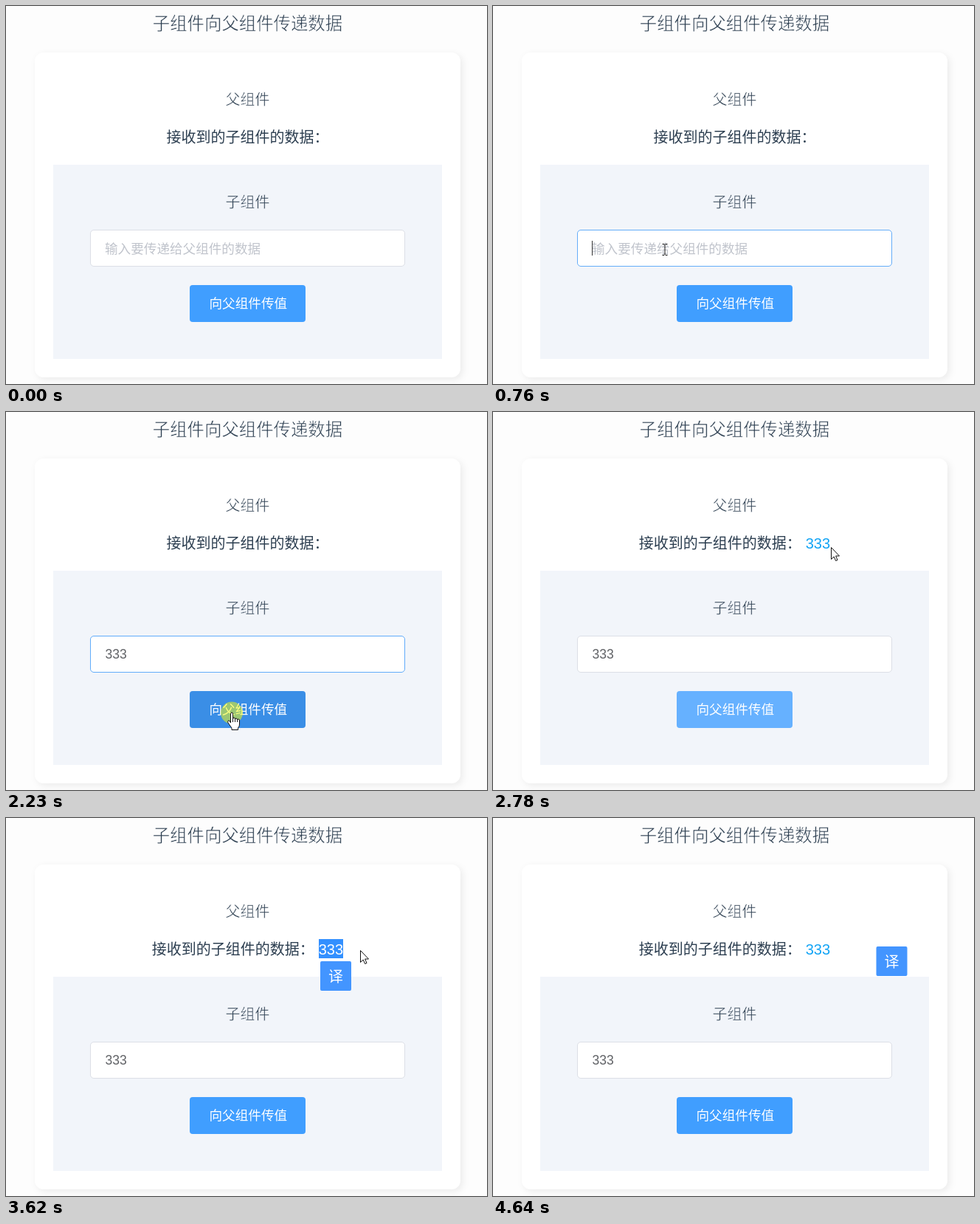
An HTML page that plays this animation: 652 px wide and 512 px high, repeating every 5440 ms.

```html
<!DOCTYPE html>
<html lang="zh-CN">
<head>
<meta charset="utf-8">
<title>组件传值</title>
<style>
  html, body { margin: 0; width: 100%; height: 100%; overflow: hidden; background: #fdfdfd; }
  svg { display: block; width: 652px; height: 512px; }
  text { font: 20px "Noto Sans CJK SC", "Noto Sans CJK", sans-serif; fill: #2c3e50; }
  .middle { text-anchor: middle; }
  /* A rim in the background colour thins the heading strokes */
  .light { text-anchor: middle; stroke: #fff; stroke-width: .55px; }
  .title { font-size: 23.4px; }
  .control { font-size: 17.6px; }
  .latin { font-family: "Liberation Sans", Arial, sans-serif; }
  .digits { font-size: 17.5px; fill: #606266; }
  .hint { fill: #c0c4cc; }
  .white { fill: #fff; }
  .card { fill: #fff; filter: drop-shadow(3px 3px 5px rgba(0, 0, 0, .07)); }
  .cursor { fill: #fff; stroke: #111; stroke-linejoin: round; }
</style>
</head>
<body>
<svg viewBox="0 0 652 512">
  <rect width="652" height="512" fill="#fdfdfd"/>
  <text class="light title" x="327.5" y="32">子组件向父组件传递数据</text>
  <rect class="card" x="39" y="63" width="577" height="440" rx="12"/>
  <text class="light" x="327.5" y="133.5">父组件</text>
  <rect id="selection" y="164" height="26" fill="#3390ff"/>
  <text id="label" y="185">接收到的子组件的数据：</text>
  <text id="result" class="latin" x="423.7" y="185">333</text>

  <rect x="64" y="215" width="527" height="263" fill="#f2f5fa"/>
  <text class="light" x="327.5" y="272.5" style="stroke:#f2f5fa">子组件</text>
  <rect id="field" x="114.5" y="303.5" width="426" height="49" rx="4.5" fill="#fff"/>
  <text id="hint" class="control hint" x="134" y="334.5">输入要传递给父组件的数据</text>
  <text id="typed" class="latin digits" x="134.5" y="334"></text>
  <rect id="caret" y="318" width="1" height="20" fill="#333"/>
  <rect id="button" x="249" y="378" width="157" height="50" rx="4"/>
  <text class="control white middle" x="328.3" y="408.5">向父组件传值</text>

  <g id="popup">
    <rect width="42" height="40" rx="2" fill="#4395ff"/>
    <text class="white middle" x="21" y="28">译</text>
  </g>
  <circle id="press" r="15" fill="#ff0" fill-opacity=".5"/>
  <g id="pointer" class="cursor">
    <path id="arrow" d="M.5 .5V16.5L4.2 13L6.6 18.5L9 17.5L6.6 12H11.5Z"/>
    <path id="beam" fill="none" d="M-3.5 -7.5H-1L0 -6.5L1 -7.5H3.5M0 -6.5V6.5M-3.5 7.5H-1L0 6.5L1 7.5H3.5"/>
    <path id="hand" d="M-1.5 13V1Q-1.5 -1 0 -1T1.5 1V8Q1.5 6 3 6T4.5 8Q4.5 7 6 7T7.5 9Q7.5 8 9 8T10.5 10V15Q10.5 18 8.5 20V22.5H0V20L-5 13Q-6 11 -4.5 10T-1.5 13ZM1.5 8V12M4.5 8V12M7.5 9V12"/>
  </g>
</svg>
<script>
const LOOP = 5440;
const TICK = 77.3;   // screen refresh interval in ms
const DIGIT = 11;    // width of one digit in the received value

const $ = id => document.getElementById(id);
const set = (id, attrs) => { for (const k in attrs) $(id).setAttribute(k, attrs[k]); };
const show = (id, on) => { $(id).style.display = on ? '' : 'none'; };
const clamp = (v, max = 1) => Math.max(0, Math.min(max, v));
const within = (t, from, to) => t >= from && t < to;
const progress = (t, from, to) => clamp((t - from) / (to - from));
const mix = (a, b, k) => a + (b - a) * k;
const inBox = (p, x, y, w, h) => within(p.x, x, x + w) && within(p.y, y, y + h);

const entry = { x: 338, y: 465 };
const moves = [
  { from: 70, to: 610, x: 233, y: 330 },     // to the field
  { from: 1860, to: 2000, x: 306, y: 408 },  // to the button
  { from: 2380, to: 2780, x: 458, y: 183 },  // to the end of the value
  { from: 2850, to: 3170, x: 427, y: 181 },  // drag across the value
  { from: 3480, to: 3630, x: 480, y: 179 },
  { from: 3630, to: 4030, x: 521, y: 161 },  // to an empty spot
  { from: 4100, to: 4550, x: 586, y: 420 }   // away
];

const pointerAt = t => moves.reduce((p, m) => {
  const k = progress(t, m.from, m.to);
  return { x: mix(p.x, m.x, k), y: mix(p.y, m.y, k) };
}, entry);

function draw(t) {
  const held = Math.floor(t / TICK + .2) * TICK;
  const p = pointerAt(held);
  const visible = within(t, 70, 1400) || within(t, 1760, 4640);
  const pressing = within(t, 2230, 2380);
  const dragging = within(t, 2850, 3480);
  const received = t >= 2380;
  const popupOpen = t >= 3480;
  const popup = t < 4100 ? { x: 426, y: 194 } : { x: 519.5, y: 174 };

  // Input field
  const count = clamp(Math.floor((t - 1400) / 140) + 1, 3);
  const focus = progress(held, 620, 820) - progress(held, 2200, 2400);
  set('field', { stroke: `rgb(${mix(220, 64, focus)}, ${mix(223, 158, focus)}, ${mix(230, 255, focus)})` });
  show('hint', count === 0);
  $('typed').textContent = '3'.repeat(count);
  set('caret', { x: Math.floor(134 + 9.73 * count) });
  show('caret', within(t, 610, 1140) || within(t, 1400, 2230));

  // Send button
  const overButton = inBox(p, 249, 378, 157, 50);
  const lit = visible && overButton || within(t, 2380, 2850);
  set('button', { fill: pressing ? '#3a8ee6' : lit ? '#66b1ff' : '#409eff' });

  // Received value and its selection
  set('label', { x: received ? 197.7 : 217.5 });
  show('result', received);
  const selected = within(t, 2850, 4030) ? dragging ? clamp(Math.round((457 - p.x) / DIGIT), 3) : 3 : 0;
  set('selection', { x: 457 - DIGIT * selected, width: DIGIT * selected });
  $('result').style.fill = selected === 3 ? '#fff' : '#12a4f5';

  // Translate popup
  show('popup', popupOpen);
  set('popup', { transform: `translate(${popup.x} ${popup.y})` });

  // Pointer
  const overPopup = popupOpen && inBox(p, popup.x, popup.y, 42, 40);
  const overText = inBox(p, 114, 303, 427, 50) || received && inBox(p, 198, 164, 260, 26);
  const shape = overButton || overPopup ? 'hand' : overText ? 'beam' : 'arrow';
  for (const id of ['arrow', 'beam', 'hand']) show(id, id === shape);
  show('pointer', visible);
  set('pointer', { transform: `translate(${Math.round(p.x)} ${Math.round(p.y)})` });
  show('press', within(t, 610, 700) || pressing || dragging);
  set('press', { cx: p.x, cy: p.y - .5 });
}

const start = performance.now();
function frame() {
  draw((performance.now() - start) % LOOP);
  requestAnimationFrame(frame);
}
frame();
</script>
</body>
</html>
```
